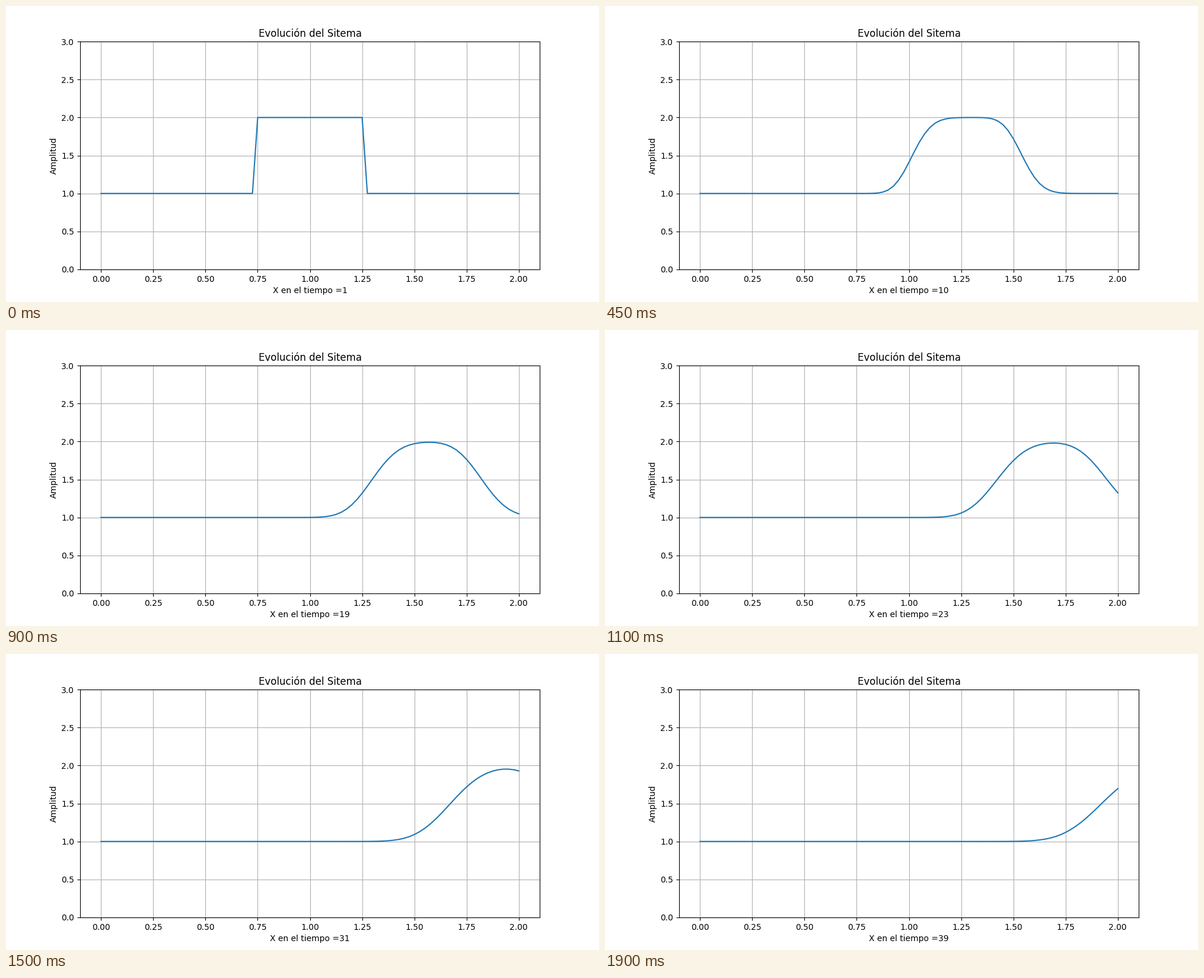
Recreate the animation shown at these times as a matplotlib script. Size 1000 by 500 pixels, loop 1950 ms.

```python
import numpy as np
import matplotlib.pyplot as plt
from matplotlib.animation import FuncAnimation

FRAMES = 39
STEPS_PER_FRAME = 5
COURANT = 0.25
CELLS = 81


def advect(u):
    """One upwind step of linear advection with a fixed left edge."""
    new = u.copy()
    new[1:] -= COURANT * (u[1:] - u[:-1])
    return new


def solve():
    u = np.ones(CELLS)
    u[30:51] = 2.0
    states = [u]
    for _ in range(FRAMES - 1):
        for _ in range(STEPS_PER_FRAME):
            u = advect(u)
        states.append(u)
    return states


x = np.linspace(0, 2, CELLS)
states = solve()

fig, ax = plt.subplots(figsize=(10, 5), dpi=100)
line, = ax.plot(x, states[0])
ax.set_xlim(-0.1, 2.1)
ax.set_ylim(0, 3)
ax.set_title("Evolución del Sitema")
ax.set_ylabel("Amplitud")
ax.grid(True)


def update(i):
    line.set_ydata(states[i])
    ax.set_xlabel(f"X en el tiempo ={i + 1}")
    return line,


anim = FuncAnimation(fig, update, frames=FRAMES, interval=50, repeat=True)
plt.show()
```
